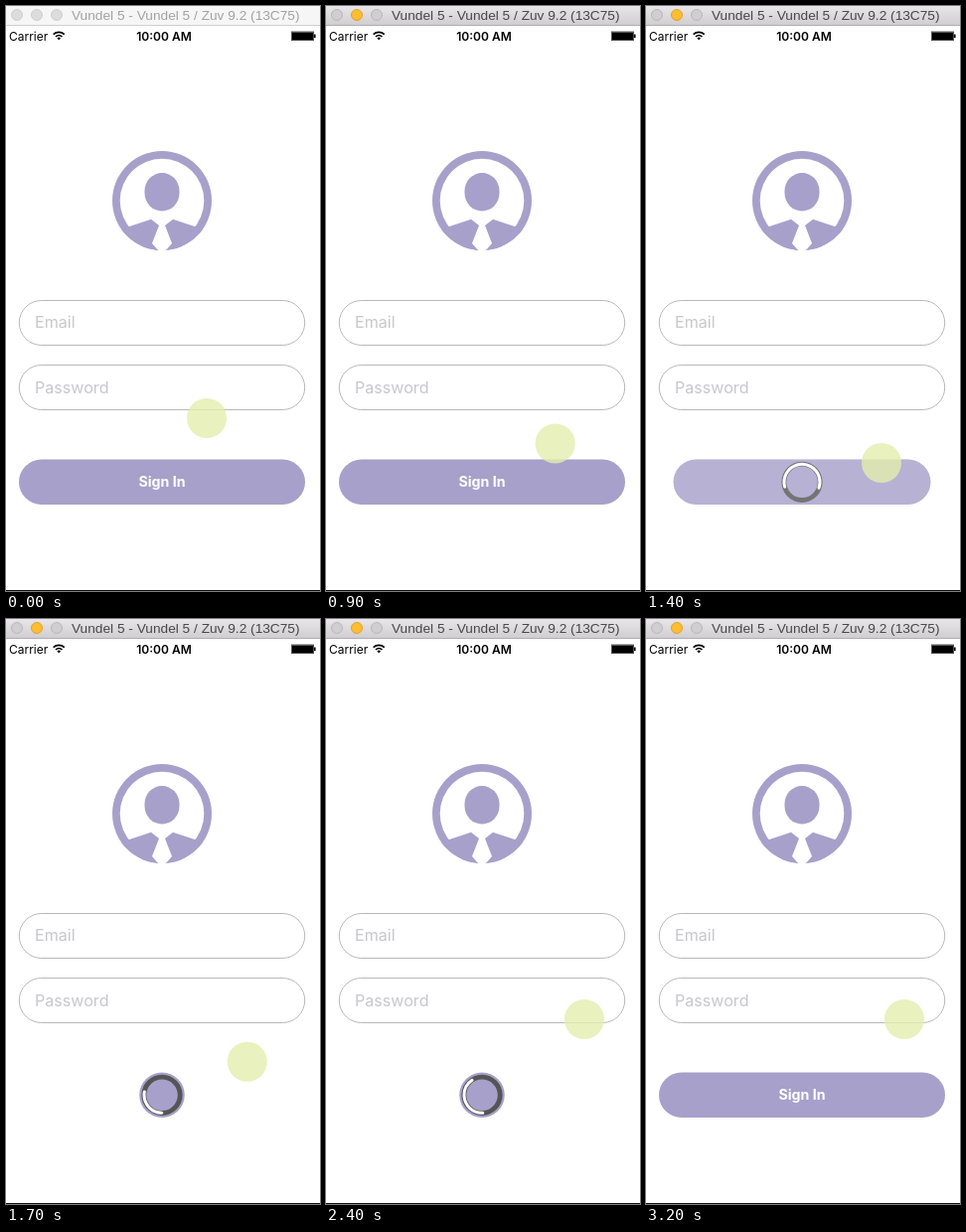
An HTML page with a canvas for the animation above (4.3 s loop, 316 by 589 pixels).

```html
<!DOCTYPE html>
<html lang="en">
<head>
<meta charset="utf-8">
<title>Sign in</title>
<style>
  html, body { margin: 0; width: 100%; height: 100%; overflow: hidden; background: #fff; }
  canvas { display: block; }
</style>
</head>
<body>
<canvas id="stage" width="316" height="589"></canvas>
<script>
const ctx = document.getElementById('stage').getContext('2d');
const LOOP = 4300, STEP = 100;
const BUSY_START = 1400, BUSY_END = 3000, READY = 3200;
const PURPLE = '#a7a0ca';
const UI = 'Inter, sans-serif';
const TITLE = 'Vundel 5 - Vundel 5 / Zuv 9.2 (13C75)';

function ease(t, start, duration) {
  const k = Math.min(1, Math.max(0, (t - start) / duration));
  return (1 - Math.cos(Math.PI * k)) / 2;
}

function disc(x, y, r, fill, stroke) {
  ctx.beginPath();
  ctx.arc(x, y, r, 0, Math.PI * 2);
  ctx.fillStyle = fill;
  ctx.fill();
  if (stroke) {
    ctx.strokeStyle = stroke;
    ctx.lineWidth = 1;
    ctx.stroke();
  }
}

function arc(x, y, r, from, to, width, color) {
  ctx.beginPath();
  ctx.arc(x, y, r, from * Math.PI / 180, to * Math.PI / 180);
  ctx.lineWidth = width;
  ctx.strokeStyle = color;
  ctx.stroke();
}

function polygon(points, fill) {
  ctx.beginPath();
  points.forEach(([x, y]) => ctx.lineTo(x, y));
  ctx.closePath();
  ctx.fillStyle = fill;
  ctx.fill();
}

function pill(x, y, w, h) {
  ctx.beginPath();
  ctx.roundRect(x, y, w, h, h / 2);
}

function label(text, x, y, font, color, align = 'left') {
  ctx.font = font;
  ctx.fillStyle = color;
  ctx.textAlign = align;
  ctx.fillText(text, x, y);
}

function drawTitleBar(active) {
  const shade = ctx.createLinearGradient(0, 0, 0, 19);
  shade.addColorStop(0, active ? '#e8e6e8' : '#f6f6f6');
  shade.addColorStop(1, active ? '#d0ced0' : '#f6f6f6');
  ctx.fillStyle = shade;
  ctx.fillRect(0, 0, 316, 19);
  ctx.fillStyle = active ? '#b0aeb0' : '#d0d0d0';
  ctx.fillRect(0, 19, 316, 1);
  for (let i = 0; i < 3; i++) {
    const x = 11 + 20 * i;
    if (active && i === 1) disc(x, 9, 5.5, '#fdbd30', '#e0a332');
    else disc(x, 9, 5.5, active ? '#d0ced0' : '#dcdcdc', active ? '#b9b7b9' : '#d0d0d0');
  }
  label(TITLE, 66, 14, '13.7px "Liberation Sans", Arial, sans-serif', active ? '#484848' : '#a2a2a2');
}

function drawStatusBar() {
  label('Carrier', 3, 35, '12px ' + UI, '#000');
  label('10:00 AM', 159, 35, '600 12px ' + UI, '#000', 'center');
  for (const r of [1.3, 4.6, 8]) arc(53.2, 34.3, r, 226, 314, r < 2 ? 2.6 : 1.7, '#000');
  ctx.strokeStyle = '#555';
  ctx.lineWidth = 1;
  ctx.strokeRect(287.5, 26, 22, 8.5);
  ctx.fillStyle = '#000';
  ctx.fillRect(288, 26.5, 21, 7.5);
  ctx.fillRect(310, 28.5, 1.6, 3.5);
}

function drawAvatar() {
  ctx.save();
  ctx.translate(157, 196);
  disc(0, 0, 50, PURPLE);
  disc(0, 0, 42.3, '#fff');
  ctx.beginPath();
  ctx.roundRect(-17.5, -28, 35, 38.5, { x: 17.5, y: 18.2 });
  ctx.fillStyle = PURPLE;
  ctx.fill();
  ctx.beginPath();
  ctx.arc(0, 0, 50, 0, Math.PI * 2);
  ctx.clip();
  for (const side of [-1, 1]) {
    const mirror = ([x, y]) => [x * side, y];
    polygon([[0, 25], [3, 25], [11, 18.8], [42, 29], [30, 51], [0, 51]].map(mirror), PURPLE);
    polygon([[0, 25], [3, 25], [10, 43], [3, 51], [0, 51]].map(mirror), '#fff');
  }
  ctx.fillStyle = '#fff';
  ctx.fillRect(-3, 24, 6, 27);
  ctx.restore();
}

function drawField(text, y, baseline) {
  pill(13.3, y + 0.5, 287.4, 45);
  ctx.strokeStyle = '#b0b0b0';
  ctx.lineWidth = 0.9;
  ctx.stroke();
  label(text, 29, baseline, '16.1px ' + UI, '#c7c7cd');
}

// A steady turn with a quick start, while the arc length swings and settles.
function drawSpinner(elapsed) {
  const middle = 342 - 70 * Math.exp(-elapsed / 100) + 0.54 * elapsed;
  const length = 135 + 80 * Math.exp(-elapsed / 600) * Math.cos(0.013 * elapsed);
  arc(157, 479.3, 18.2, 0, 360, 4.8, '#555');
  ctx.lineCap = 'round';
  arc(157, 479.3, 18, middle - length / 2, middle + length / 2, 3, '#fff');
  ctx.lineCap = 'butt';
}

function drawButton(t) {
  const shrink = ease(t, 1312, 390) - ease(t, 2900, 235);
  const width = 288 - 242.5 * shrink;
  const drawShape = color => {
    pill(157 - width / 2, 456.5, width, 45.5);
    ctx.fillStyle = color;
    ctx.fill();
  };
  drawShape(PURPLE);
  if (t < BUSY_START || t >= READY) {
    label('Sign In', 157, 484, '700 14.2px ' + UI, '#fff', 'center');
    return;
  }
  if (t < BUSY_END) drawSpinner(t - BUSY_START);
  const flash = 0.18 * Math.max(0, 1 - (t - BUSY_START) / 300);
  drawShape(`rgba(255, 255, 255, ${flash})`);
}

function drawTouch(t) {
  const approach = ease(t, 100, 500), press = ease(t, 800, 300), leave = ease(t, 1400, 900);
  const x = 202 + 26.5 * approach + 8.5 * press + 23 * leave;
  const y = 415 + 19 * approach + 26 * press - 57 * leave;
  disc(x, y, 20, 'rgba(228, 238, 174, 0.8)');
}

function draw(now) {
  const t = Math.floor(now % LOOP / STEP) * STEP;
  ctx.fillStyle = '#fff';
  ctx.fillRect(0, 0, 316, 589);
  drawTitleBar(t >= 200);
  drawStatusBar();
  drawAvatar();
  drawField('Email', 296, 324);
  drawField('Password', 361, 389.6);
  drawButton(t);
  drawTouch(t);
  ctx.fillStyle = '#111';
  ctx.fillRect(0, 588, 316, 1);
}

let start;
function tick(now) {
  start ??= now;
  draw(now - start);
  requestAnimationFrame(tick);
}
requestAnimationFrame(tick);
</script>
</body>
</html>
```
